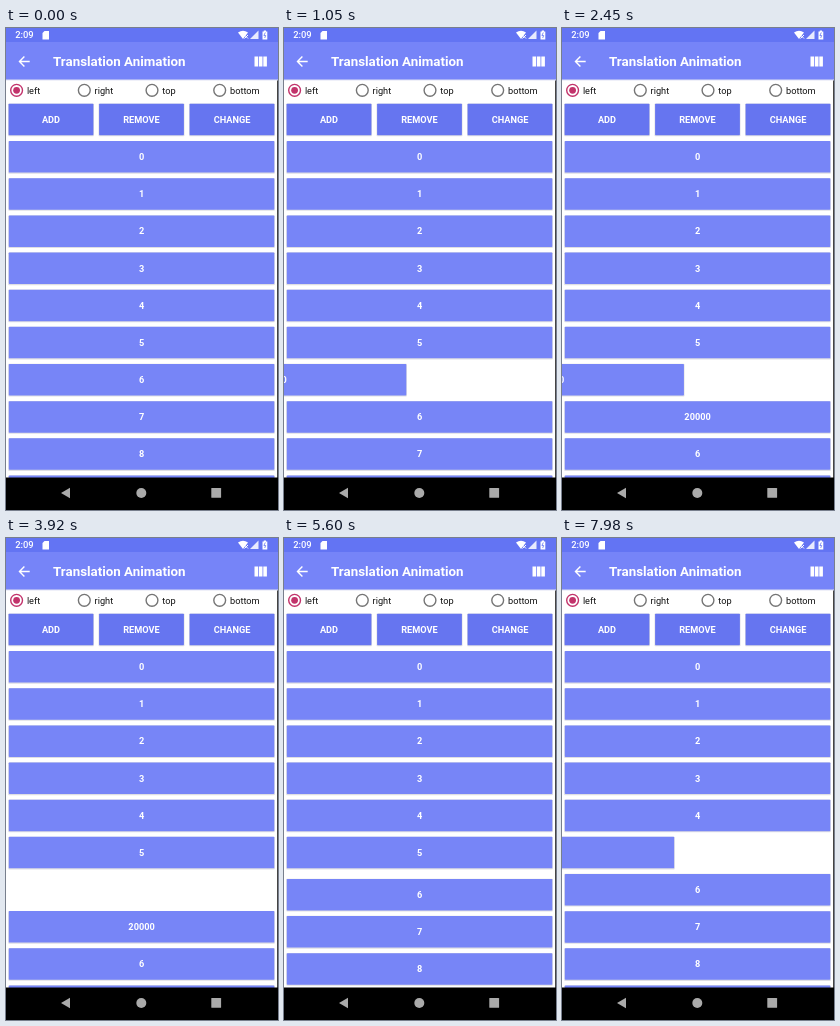
Animation, 272 px wide and 482 px high, one loop 8 s. Source, as an HTML page:

```html
<!DOCTYPE html>
<html lang="en">
<head>
<meta charset="utf-8">
<title>Translation Animation</title>
<style>
  html, body { margin: 0; width: 100%; height: 100%; overflow: hidden; background: #fff; }
  svg { display: block; width: 272px; height: 482px; font: 9.2px Roboto, sans-serif; }
  .label { fill: #fff; font-weight: 600; text-anchor: middle; }
  .row { fill: #7785f7; }
  .action { fill: #6675f0; }
  .shadow { fill: #335; opacity: .16; }
  .white { fill: #fff; }
</style>
</head>
<body>
<svg viewBox="0 0 272 482">
  <rect width="272" height="482" fill="#fff"/>
  <g id="list"></g>

  <rect x="271" y="52" width="1" height="430" fill="#444"/>
  <rect y="51" width="272" height="1.5" fill="#dfe1f3"/>
  <rect width="272" height="51.5" fill="#7684f8"/>
  <rect width="272" height="14" fill="#6374f3"/>
  <g class="white">
    <text x="9.2" y="10.4" font-size="9.4" font-weight="500">2:09</text>
    <path d="M38.500 3H43V11.500H36.500V5Z"/>
    <path d="M232 4.500Q237 1 242 4.500L237 11Z"/>
    <path d="M252.500 2.500V11H244Z" opacity=".85"/>
    <path d="M257.800 2.500H260V3.500H261.300V11.500H256.500V3.500H257.800Z"/>
    <text x="47" y="38.200" font-size="13.350" font-weight="600">Translation Animation</text>
    <path d="M248.500 28.500h3.600v10h-3.600zm4.400 0h3.600v10h-3.600zm4.400 0h3.600v10h-3.600z"/>
  </g>
  <path d="M238.500 7l3.500 3.500m0-3.500l-3.500 3.500" stroke="#fff"/>
  <path d="M259.300 4.500l-1.400 3h1.800l-1 2.500" fill="none" stroke="#6374f3" stroke-width=".8"/>
  <path d="M23.700 33.500H13.700M18.400 28.600L13.500 33.500L18.400 38.400" fill="none" stroke="#fff" stroke-width="1.400"/>

  <g id="controls"></g>

  <rect y="449.500" width="272" height="32.500"/>
  <g fill="#aaa">
    <path d="M55 465L64 459.700V470.300Z"/>
    <circle cx="135.300" cy="465" r="5"/>
    <rect x="205.300" y="460" width="9.800" height="9.800" rx=".6"/>
  </g>
</svg>
<script>
const LOOP = 8000, PITCH = 37.15, TOP = 113.1, SCREEN = 271;
const list = document.getElementById('list');
const controls = document.getElementById('controls');

function add(parent, name, attrs, text = '') {
  const node = document.createElementNS('http://www.w3.org/2000/svg', name);
  for (const key in attrs) node.setAttribute(key, attrs[key]);
  node.textContent = text;
  return parent.appendChild(node);
}

function button(parent, type, x, y, width, text) {
  const g = add(parent, 'g', {});
  add(g, 'rect', { class: 'shadow', x: x - .6, y: y - .2, width: width + 1.2, height: 32.8, rx: 1 });
  add(g, 'rect', { class: type, x, y, width, height: 31.5, rx: .7 });
  add(g, 'text', { class: 'label', x: x + width / 2, y: y + 19 }, text);
  return g;
}

['left', 'right', 'top', 'bottom'].forEach((side, i) => {
  const cx = 10.6 + i * 67.7, color = i ? '#757575' : '#c2336b';
  add(controls, 'circle', { cx, cy: 62.3, r: 5.9, fill: 'none', stroke: color, 'stroke-width': 1.4 });
  if (!i) add(controls, 'circle', { cx, cy: 62.3, r: 3.4, fill: color });
  add(controls, 'text', { x: cx + 10.3, y: 65.6, fill: '#111' }, side);
});
['ADD', 'REMOVE', 'CHANGE'].forEach((text, i) =>
  button(controls, 'action', 2.6 + i * 90.5, 75.7, 84.8, text));

const row = text => button(list, 'row', 2.8, TOP, 265.5, text);
const rows = Array.from({ length: 10 }, (_, i) => row(i));
const first = row('20000'), second = row('20000');

function place(node, slide, shift) {
  node.setAttribute('transform', `translate(${slide * SCREEN} ${shift * PITCH})`);
}

function draw(t) {
  // Accelerate-decelerate progress between two times
  const ease = (start, end) => {
    const p = Math.min(1, Math.max(0, (t - start) / (end - start)));
    return (1 - Math.cos(p * Math.PI)) / 2;
  };
  const firstGap = ease(718, 945) - ease(5224, 5718);
  const secondGap = ease(1930, 2284) - ease(3915, 4265);
  rows.forEach((node, i) => place(node,
    i === 5 ? -ease(7158, 8658) : 0,
    i > 5 ? i + firstGap + secondGap : i));
  place(first, ease(945, 1168) - 1 - ease(4730, 5224), 6 + secondGap);
  place(second, ease(2284, 2636) - 1 - ease(3680, 3915), 6);
}

const begin = performance.now();
function tick() {
  draw((performance.now() - begin) % LOOP);
  requestAnimationFrame(tick);
}
tick();
</script>
</body>
</html>
```
